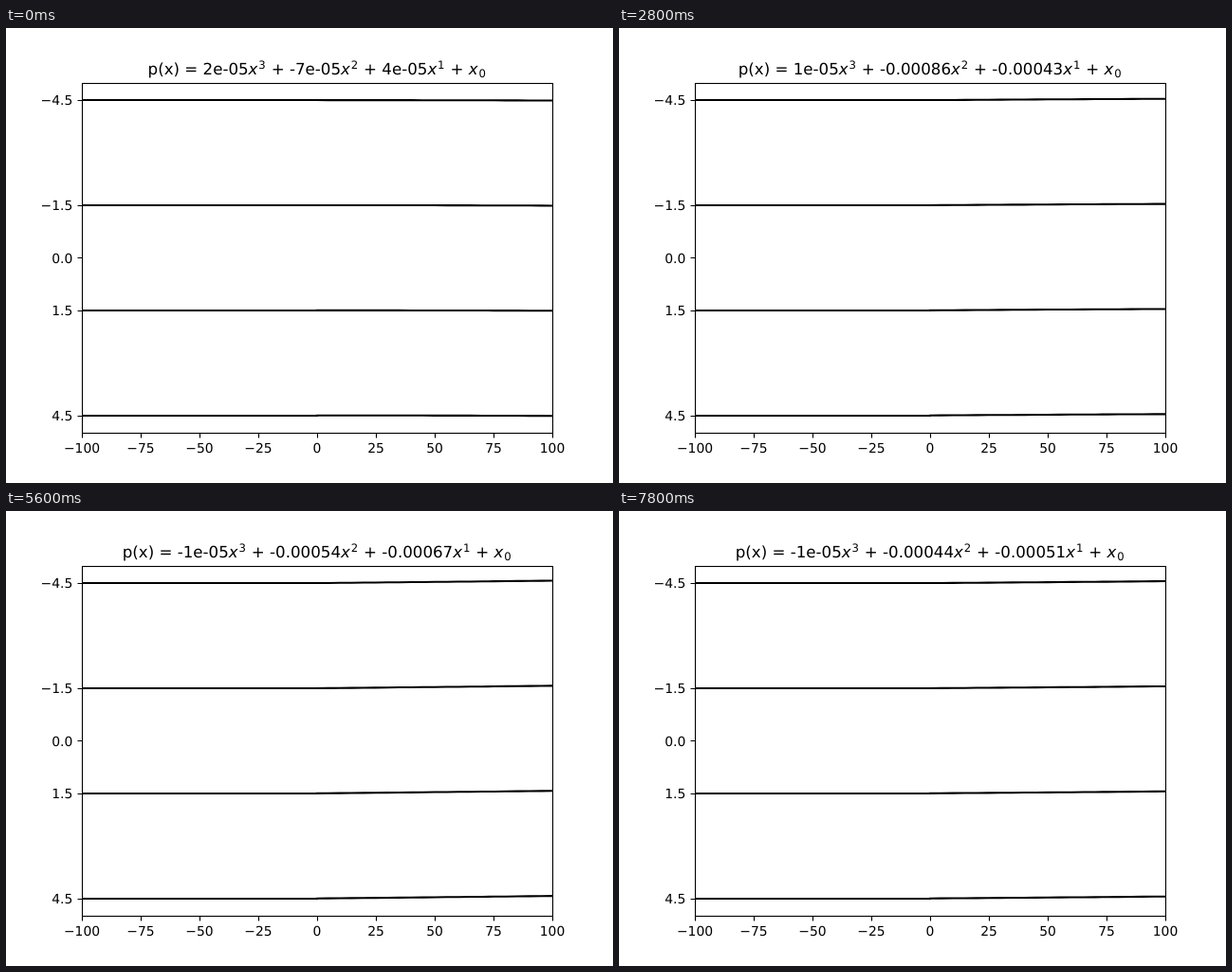
Animation, 640 px wide and 480 px high, one loop 8000 ms. Source, as an HTML page:

```html
<!DOCTYPE html>
<html lang="en">
<head>
<meta charset="utf-8">
<title>Polynomial lanes</title>
<style>
html, body { margin: 0; width: 100%; height: 100%; overflow: hidden; background: #fff; }
svg { display: block; width: 640px; height: 480px; }
text { font-family: "DejaVu Sans", sans-serif; font-size: 13.89px; text-rendering: geometricPrecision; white-space: pre; }
#title { font-size: 16.667px; }
.var { font-style: italic; }
.script { font-size: 11.667px; }
.lane { fill: none; stroke: #000; stroke-width: 2.083; }
.axis { fill: none; stroke: #000; stroke-width: 1.11; }
</style>
</head>
<body>
<svg id="stage" viewBox="0 0 640 480">
  <defs><clipPath id="plot"><rect x="80" y="57.6" width="496" height="369.6"/></clipPath></defs>
  <text id="title" x="327.7" y="49" text-anchor="middle"></text>
  <g id="lanes" clip-path="url(#plot)"></g>
  <g id="axes"></g>
</svg>
<script>
const LOOP = 8000, STEP = 200;
const UNIT = 36.96, MID_X = 328, MID_Y = 242.4;
const offsets = [-4.5, -1.5, 1.5, 4.5];

// step, then the cubic, quadratic and linear coefficients in units of 1e-5
const keys = [
  [0, 2, -7, 4], [5, 3, -88, -5], [9, 2, -60, -33], [18, 1, -106, -51],
  [24, -0.3, -33, -58], [32, -1, -76, -77], [39, -1, -44, -51]
];

const $ = id => document.getElementById(id);

function add(parent, tag, attrs, text) {
  const el = document.createElementNS("http://www.w3.org/2000/svg", tag);
  for (const name in attrs) el.setAttribute(name, attrs[name]);
  if (text !== undefined) el.textContent = text;
  parent.appendChild(el);
  return el;
}

const minus = s => s.replace("-", "\u2212");

function drawAxes() {
  const axes = $("axes");
  let ticks = "";
  for (let v = -100; v <= 100; v += 25) {
    const x = MID_X + v * 2.48;
    ticks += `M${x + 0.5} 427.5v5`;
    add(axes, "text", { x, y: 448, "text-anchor": "middle" }, minus(String(v)));
  }
  for (const v of [...offsets, 0]) {
    const y = Math.round(MID_Y + v * UNIT);
    ticks += `M80.5 ${y + 0.5}h-5`;
    add(axes, "text", { x: 70.3, y: y + (v ? 5 : 6), "text-anchor": "end" }, minus(v.toFixed(1)));
  }
  add(axes, "path", { class: "axis", d: ticks });
  add(axes, "rect", { class: "axis", x: 80.5, y: 58.5, width: 496, height: 369 });
}

function coefficients(step) {
  let i = 0;
  while (i < keys.length - 2 && step >= keys[i + 1][0]) i++;
  const a = keys[i], b = keys[i + 1];
  const k = (step - a[0]) / (b[0] - a[0]);
  return [1, 2, 3].map(j => a[j] + (b[j] - a[j]) * k);
}

// Five decimals, with an exponent below 1e-4
function format(c) {
  const n = Math.round(c);
  if (n === 0) return Object.is(n, -0) ? "-0.0" : "0.0";
  return Math.abs(n) < 10 ? n + "e-05" : String(n / 1e5);
}

function drawTitle(coefs) {
  const title = $("title");
  title.textContent = "";
  const term = (lead, digit, shift) => {
    add(title, "tspan", {}, lead);
    add(title, "tspan", { class: "var" }, "x");
    add(title, "tspan", { class: "script", dx: 0.8, dy: shift }, digit);
  };
  coefs.forEach((c, i) => {
    term((i ? " + " : "p(x) = ") + format(c), 3 - i, -6.4);
    add(title, "tspan", { dx: 0.7, dy: 6.4 }, "\u200b");
  });
  term(" + ", 0, 2.7);
}

const lanes = offsets.map(v => {
  const y = MID_Y + v * UNIT;
  add($("lanes"), "path", { class: "lane", d: `M80 ${Math.round(y)}H329` });
  return { y, path: add($("lanes"), "path", { class: "lane" }) };
});

function drawLanes([cubic, , linear]) {
  for (const { y, path } of lanes) {
    let d = "";
    for (let i = 0; i <= 20; i++) {
      const u = i / 20;
      const bend = (linear * 100 * u + cubic * 430 * u ** 3) * 1e-5;
      d += `${i ? "L" : "M"}${MID_X - 1 + 250 * u} ${(y + bend * UNIT).toFixed(3)}`;
    }
    path.setAttribute("d", d);
  }
}

let shown = -1;
function render(time) {
  const step = Math.floor((time % LOOP) / STEP);
  if (step === shown) return;
  shown = step;
  const coefs = coefficients(step);
  drawTitle(coefs);
  drawLanes(coefs);
}

drawAxes();
render(0);
const start = performance.now();
requestAnimationFrame(function tick() {
  render(performance.now() - start);
  requestAnimationFrame(tick);
});
</script>
</body>
</html>
```
